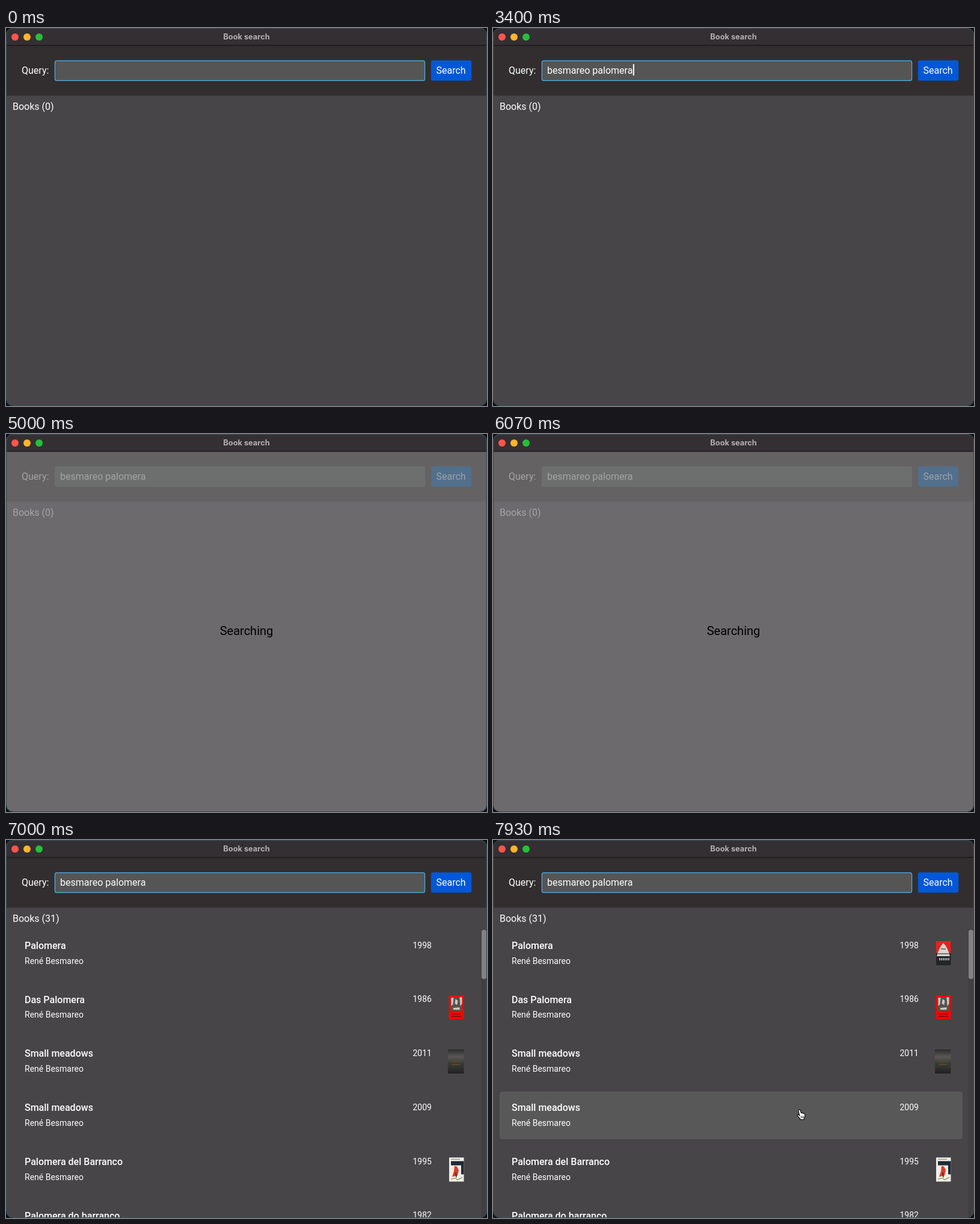
Recreate the animation shown at these times as an HTML page. Size 800x628 px, loop 8000 ms.

```html
<!DOCTYPE html>
<html lang="en">
<head>
<meta charset="utf-8">
<title>Book search</title>
<style>
html, body { margin: 0; width: 100%; height: 100%; overflow: hidden; background: #08131c; }
svg { display: block; width: 800px; height: 628px; font: 16px Roboto, sans-serif;
  --content: #474547; --panel: #322e30; --field: #565556; --ring: #4fb0e4;
  --button: #0058d8; --text: #fff; --caption: #fff; }
svg.busy { --content: #6c6a6c; --panel: #656264; --field: #6d6e6e; --ring: #6d6e6e;
  --button: #526f8c; --text: #a6a4a6; --caption: #9fa3a8; }
text { fill: var(--text); white-space: pre; }
.title { font: 700 12.8px Inter, sans-serif; fill: #b4b1b3; text-anchor: middle; }
.name { font-weight: 500; }
.small { font-size: 14px; }
.wait { font-size: 20px; fill: #000; text-anchor: middle; }
</style>
</head>
<body>
<svg id="stage" viewBox="0 0 800 628">
  <defs>
    <clipPath id="win"><rect x="1" y="1" width="798" height="626" rx="10"/></clipPath>
    <linearGradient id="dusk" x2="0" y2="1">
      <stop offset="0" stop-color="#2b2c2e"/><stop offset=".3" stop-color="#5a5854"/>
      <stop offset=".55" stop-color="#3b3e37"/><stop offset="1" stop-color="#222123"/>
    </linearGradient>
  </defs>
  <g clip-path="url(#win)">
    <rect width="800" height="628" fill="var(--content)"/>
    <rect width="800" height="112.5" fill="var(--panel)"/>
    <rect width="800" height="29" fill="#332f32"/>
    <rect y="28.3" width="800" height="1.2" fill="#151315"/>
    <circle cx="15" cy="15" r="6" fill="#ff544d"/>
    <circle cx="35" cy="15" r="6" fill="#ffb429"/>
    <circle cx="55" cy="15" r="6" fill="#24c138"/>
    <text class="title" x="400" y="19">Book search</text>

    <text x="26" y="75.5">Query:</text>
    <rect x="81.4" y="54.3" width="615.2" height="33.1" rx="3" fill="var(--field)" stroke="var(--ring)" stroke-width="1.2"/>
    <text id="query" x="90" y="75.5"></text>
    <rect id="caret" y="60" width="2" height="19" fill="#fff"/>
    <rect x="706.8" y="53.8" width="67.4" height="33.8" rx="3.5" fill="var(--button)"/>
    <text x="715.5" y="75.5" style="fill:var(--caption)">Search</text>
    <text id="count" x="11" y="135.5"></text>
    <text id="wait" class="wait" x="400" y="334">Searching</text>

    <g id="results">
      <rect id="hover" x="11" y="418" width="770" height="79" rx="4" fill="#585858"/>
      <g id="rows"></g>
      <rect x="790.5" y="148.5" width="9" height="480" fill="#413f41"/>
      <rect x="791" y="149" width="8" height="82" rx="4" fill="#838183"/>
      <g class="cover" data-at="7870" transform="translate(737 168)">
        <rect width="24.5" height="40" fill="#222426"/>
        <rect width="24.5" height="20" fill="#e5231d"/>
        <path d="M1 25L4 16L8 8L12 3L16 8L20 16L23 25Z" fill="#d9d6d2"/>
        <path d="M3 21H21M8 13H16" stroke="#5c5554" stroke-width="1.5"/>
        <path d="M5 30H22" stroke="#a4a6a8" stroke-width="4" stroke-dasharray="2 1"/>
      </g>
      <g class="cover" data-at="6870" transform="translate(736.5 258)">
        <rect width="25" height="40" fill="#f60502"/>
        <rect x="3" y="3" width="19" height="23" fill="#55524f"/>
        <path d="M4 4H8L7 15L4 18ZM11 6L15 9L14 16L10 14ZM18 3H22V14L19 18ZM7 21L18 20V24H8Z" fill="#cbc6bf"/>
        <path d="M5 31H20M4 35H21" stroke="#9c0805" stroke-width="2"/>
      </g>
      <g class="cover" data-at="6930" transform="translate(735 348)">
        <rect width="26.5" height="40" fill="url(#dusk)"/>
        <path d="M5 20H22M7 25H20" stroke="#58482f" stroke-width="2"/>
      </g>
      <g class="cover" data-at="6930" transform="translate(737 527.5)">
        <rect width="24.5" height="40" fill="#efeee6"/>
        <path d="M3 6H24.5V28H20V13H3Z" fill="#202a35"/>
        <path d="M3 3H18" stroke="#777b7c"/>
        <path d="M9 14L13 15L16 21L14 30L5 32L8 23Z" fill="#df3a28"/>
        <path d="M11 25L12 33" stroke="#2b2727" stroke-width="1.5"/>
        <path d="M3 36L10 34L14 37L22 33" fill="none" stroke="#a5a46f" stroke-width="1.5"/>
      </g>
    </g>
  </g>
  <rect x=".7" y=".7" width="798.6" height="626.6" rx="10" fill="none" stroke="#4a5f68" stroke-width=".9"/>
  <g id="hand">
    <path d="M3.5 1.2C4.6.6 5.4 1.2 5.7 2.2L7 6.5C8 5.7 9 6 9.3 7C10.3 6.4 11.2 6.8 11.4 7.7C12.5 7.4 13.2 8 13.3 9V13L11.8 15.5V17.5H5.2V15.8L.8 11.2C0 9.9 1.3 8.8 2.4 9.6L4.2 11L2.6 3C2.4 2.1 2.8 1.5 3.5 1.2Z"
      fill="#fff" stroke="#000" stroke-width="1.1"/>
    <path d="M7 11.5V15M9 11.5V15M11 11.5V15" stroke="#000" stroke-width=".8"/>
  </g>
</svg>
<script>
const LOOP = 8000, BUSY = 3470, DONE = 6270, POINT = 7270;
const phrase = "besmareo palomera";
const keys = [730, 870, 1000, 1200, 1400, 1530, 1670, 1800, 2070,
              2130, 2270, 2400, 2530, 2670, 2800, 2930, 3070];
const author = "René Besmareo";
const books = [
  ["Palomera", 1998], ["Das Palomera", 1986], ["Small meadows", 2011],
  ["Small meadows", 2009], ["Palomera del Barranco", 1995], ["Palomera do barranco", 1982]
];
const el = id => document.getElementById(id);
const show = (node, on) => node.style.display = on ? "" : "none";
const covers = document.querySelectorAll(".cover");

el("rows").innerHTML = books.map(([name, year], i) => {
  const y = 181 + i * 89.7;
  return `<text class="name" x="31" y="${y}">${name}</text>
    <text class="small" x="31" y="${y + 24.7}">${author}</text>
    <text class="small" x="676.5" y="${y - 1.3}">${year}</text>`;
}).join("");

function caretOn(t) {
  if (t < BUSY) return t >= 400 && (t - 400) % 1000 < 270;
  return t >= 6730 && (t - 6730) % 1000 < 200;
}

function draw(t) {
  const busy = t >= BUSY && t < DONE, done = t >= DONE;
  el("stage").classList.toggle("busy", busy);
  el("query").textContent = phrase.slice(0, keys.filter(k => k <= t).length);
  el("caret").setAttribute("x", 90.5 + el("query").getComputedTextLength());
  show(el("caret"), caretOn(t));
  el("count").textContent = `Books (${done ? 31 : 0})`;
  show(el("wait"), busy);
  show(el("results"), done);
  covers.forEach(c => show(c, t >= +c.dataset.at));

  // The pointer slows down as it settles.
  const left = (1 - Math.min(1, Math.max(0, (t - POINT) / 600))) ** 3;
  show(el("hand"), t >= POINT);
  show(el("hover"), t >= POINT);
  el("hand").setAttribute("transform", `translate(${505.5 + 60 * left} ${447 - 14 * left})`);
}

const start = performance.now();
function tick() {
  draw((performance.now() - start) % LOOP);
  requestAnimationFrame(tick);
}
tick();
</script>
</body>
</html>
```
